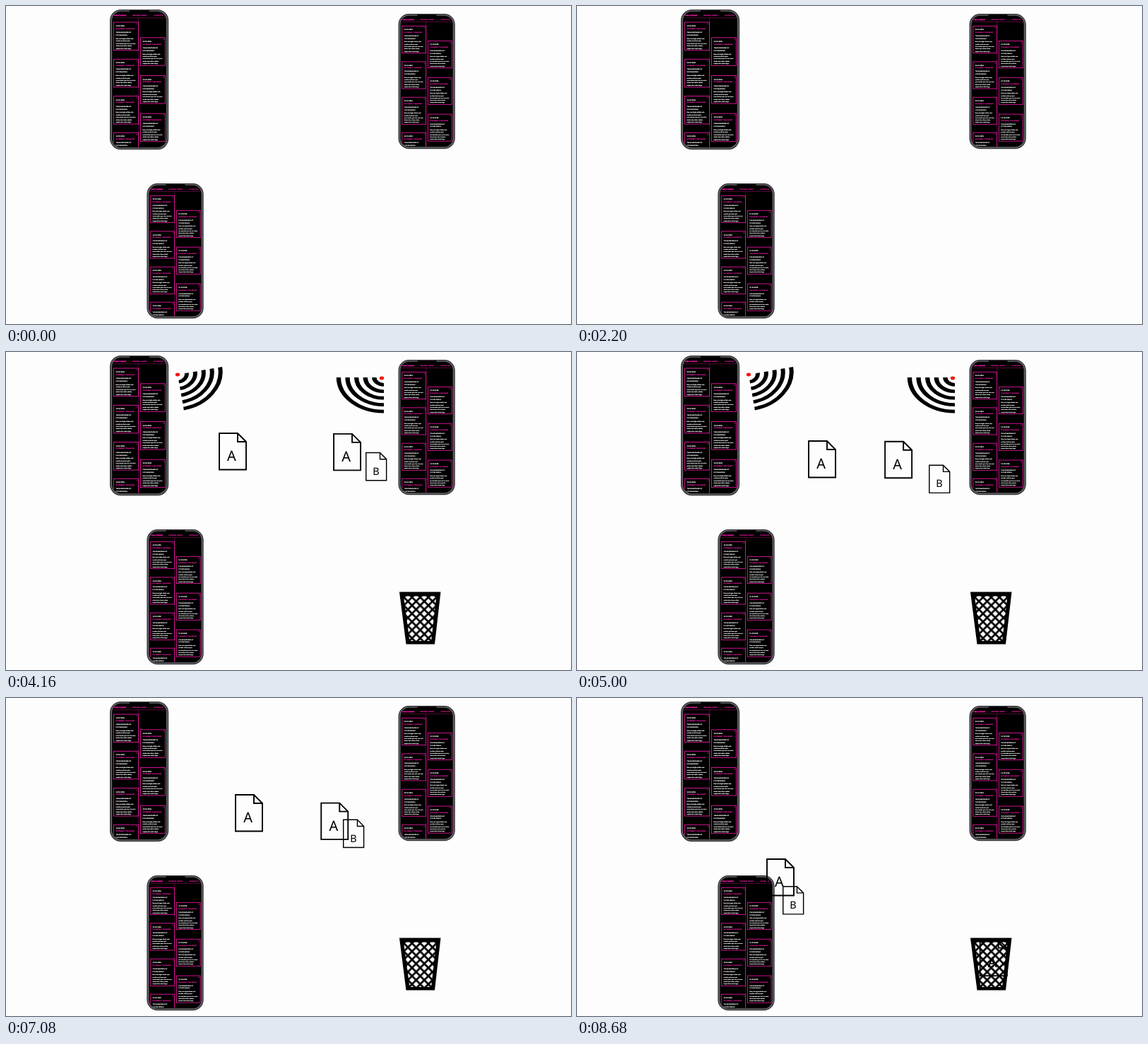
An HTML page that plays this animation: 800 by 450 pixels, repeating every 8720 ms.

```html
<!DOCTYPE html>
<html lang="en">
<head>
<meta charset="utf-8">
<title>Shared libraries</title>
<style>
  html, body { margin: 0; height: 100%; overflow: hidden; background: #fefdfe; }
  svg { display: block; width: 100vw; height: 100vh; text-rendering: geometricPrecision; }
  .tiny { font-family: "Liberation Sans", Arial, sans-serif; fill: #fff; stroke: #fff; stroke-width: .16; }
  .pink { fill: #f01ca6; stroke: #f01ca6; }
  .letter { font-family: "Noto Sans", "Open Sans", sans-serif; text-anchor: middle; }
  .frame { fill: none; stroke: #d4148f; }
</style>
</head>
<body>
<svg viewBox="0 0 800 450">
  <defs>
    <clipPath id="screen"><rect x="3.8" y="3.5" width="75.6" height="191" rx="11.5"/></clipPath>
    <pattern id="mesh" x="580.7" y="347" width="11.6" height="11.6" patternUnits="userSpaceOnUse">
      <path id="diamond" fill="#fefdfe" d="M5.8 1.9L9.7 5.8L5.8 9.7L1.9 5.8Z"/>
      <use href="#diamond" x="-5.8" y="-5.8"/>
      <use href="#diamond" x="5.8" y="-5.8"/>
      <use href="#diamond" x="-5.8" y="5.8"/>
      <use href="#diamond" x="5.8" y="5.8"/>
    </pattern>
    <g id="card">
      <rect class="frame" width="35" height="39.5"/>
      <path class="frame" stroke-width=".6" d="M32 1.5l1.8 1.8m0-1.8l-1.8 1.8"/>
      <g class="tiny" id="copy"></g>
    </g>
    <g id="phone">
      <rect x=".6" y=".6" width="82" height="197" rx="15" fill="#606063" stroke="#343436" stroke-width="1.2"/>
      <rect x="3.2" y="2.8" width="76.8" height="192.4" rx="12.5"/>
      <g id="content" clip-path="url(#screen)">
        <path class="frame" stroke-width=".6" stroke-opacity=".7" d="M3 11.8H80M40.8 11.8V196"/>
        <g class="tiny pink" font-size="2.1">
          <text x="6" y="9.3" font-weight="bold" stroke-width=".3">PUBLIC LIBRARY</text>
          <text x="32" y="9.3">PERSONAL LIBRARY</text>
          <text x="62" y="9.3">UPLOAD FILE</text>
        </g>
      </g>
      <path d="M28 1.2H56V4a2 2 0 0 1-2 2H30a2 2 0 0 1-2-2Z"/>
    </g>
    <g id="signal">
      <g id="arcs" fill="none" stroke="#000" stroke-width="6"></g>
    </g>
    <path id="sheet" fill="none" stroke="#000" d="M1 1H27L39 13V52.5H1ZM27 1V13H39"/>
  </defs>

  <use href="#phone" x="147" y="5"/>
  <use href="#phone" transform="translate(555.5 11) scale(.965)"/>
  <use href="#phone" transform="translate(199.4 251) scale(.965)"/>

  <g id="props">
    <path d="M557 339.5H615.5L607 413.5H566.5Z"/>
    <path fill="url(#mesh)" d="M563 345.5H609.5L602 409H571.5Z"/>
    <g id="docs"></g>
    <g id="signals">
      <use href="#signal" transform="translate(243 32) rotate(-10) scale(1 .8)"/>
      <use href="#signal" transform="translate(535 36) scale(-1.05 .79)"/>
      <ellipse cx="243" cy="32" rx="3.2" ry="2.4" fill="#f01810"/>
      <ellipse cx="532" cy="37" rx="3.2" ry="2.4" fill="#f01810"/>
    </g>
  </g>
</svg>
<script>
const LOOP = 8720, FRAME = 40;
const SHOW = 3360, MEET = 5095, SIGNAL_OFF = 5120, LEAVE = 6936, ARRIVE = 8430;
const $ = id => document.getElementById(id);

function add(parent, tag, attrs, text = '') {
  const el = document.createElementNS('http://www.w3.org/2000/svg', tag);
  for (const key in attrs) el.setAttribute(key, attrs[key]);
  el.textContent = text;
  return parent.appendChild(el);
}

const lines = [
  [6.2, 2.5, '12.10.2019'],
  [9.8, 2.2, 'STATEMENT PUBLISHING'],
  [15.2, 2.05, 'THE ADVANTAGES OF'],
  [19.1, 2.05, 'FUTURE WORLD'],
  [23.8, 2.05, 'Nam rem fugita alitatis aute'],
  [27.3, 2.05, 'vendias molorum quia'],
  [30.7, 2.05, 'eos sumdae que non nos cone'],
  [34.1, 2.05, 'aboris dem rebus veliate,'],
  [37.5, 2.05, 'eaquia dam estem fuga.']
];
lines.forEach(([y, size, text], i) =>
  add($('copy'), 'text', { x: 3, y, 'font-size': size, class: i === 1 ? 'pink' : '' }, text));

for (const y of [18, 70.3, 122.5, 174.3]) add($('content'), 'use', { href: '#card', x: 5.5, y });
for (const y of [39.8, 93.5, 147.2]) add($('content'), 'use', { href: '#card', x: 43.5, y });

for (let r = 13; r <= 61; r += 12) add($('arcs'), 'path', { d: `M${r} 0A${r} ${r} 0 0 1 0 ${r}` });

// Each path: start, meeting point, destination
const docs = [
  { letter: 'A', path: [[276.2, 103.5], [330, 126.3], [268, 227]] },
  { letter: 'A', path: [[489.7, 104.5], [432, 127], [569.7, 340.6]] },
  { letter: 'B', small: true, path: [[519.5, 124.9], [496.8, 161.5], [291, 266]] }
];
for (const doc of docs) {
  doc.el = add($('docs'), 'g', {});
  add(doc.el, 'use', { href: '#sheet', transform: `scale(${doc.small ? .76 : 1})`, 'stroke-width': 1.9 });
  const place = doc.small ? { x: 15, y: 32, 'font-size': 14.5 } : { x: 18.5, y: 40, 'font-size': 20 };
  add(doc.el, 'text', { class: 'letter', ...place }, doc.letter);
}

const progress = (t, from, to) => Math.min(1, Math.max(0, (t - from) / (to - from)));

function draw(now) {
  const t = Math.floor(now % LOOP / FRAME) * FRAME;
  $('props').style.display = t < SHOW ? 'none' : '';
  $('signals').style.display = t < SIGNAL_OFF ? '' : 'none';
  const out = progress(t, SHOW, MEET), back = progress(t, LEAVE, ARRIVE);
  for (const { el, path: [a, b, c] } of docs) {
    const at = [0, 1].map(i => a[i] + (b[i] - a[i]) * out + (c[i] - b[i]) * back);
    el.setAttribute('transform', `translate(${at})`);
  }
  requestAnimationFrame(draw);
}
draw(performance.now());
</script>
</body>
</html>
```
